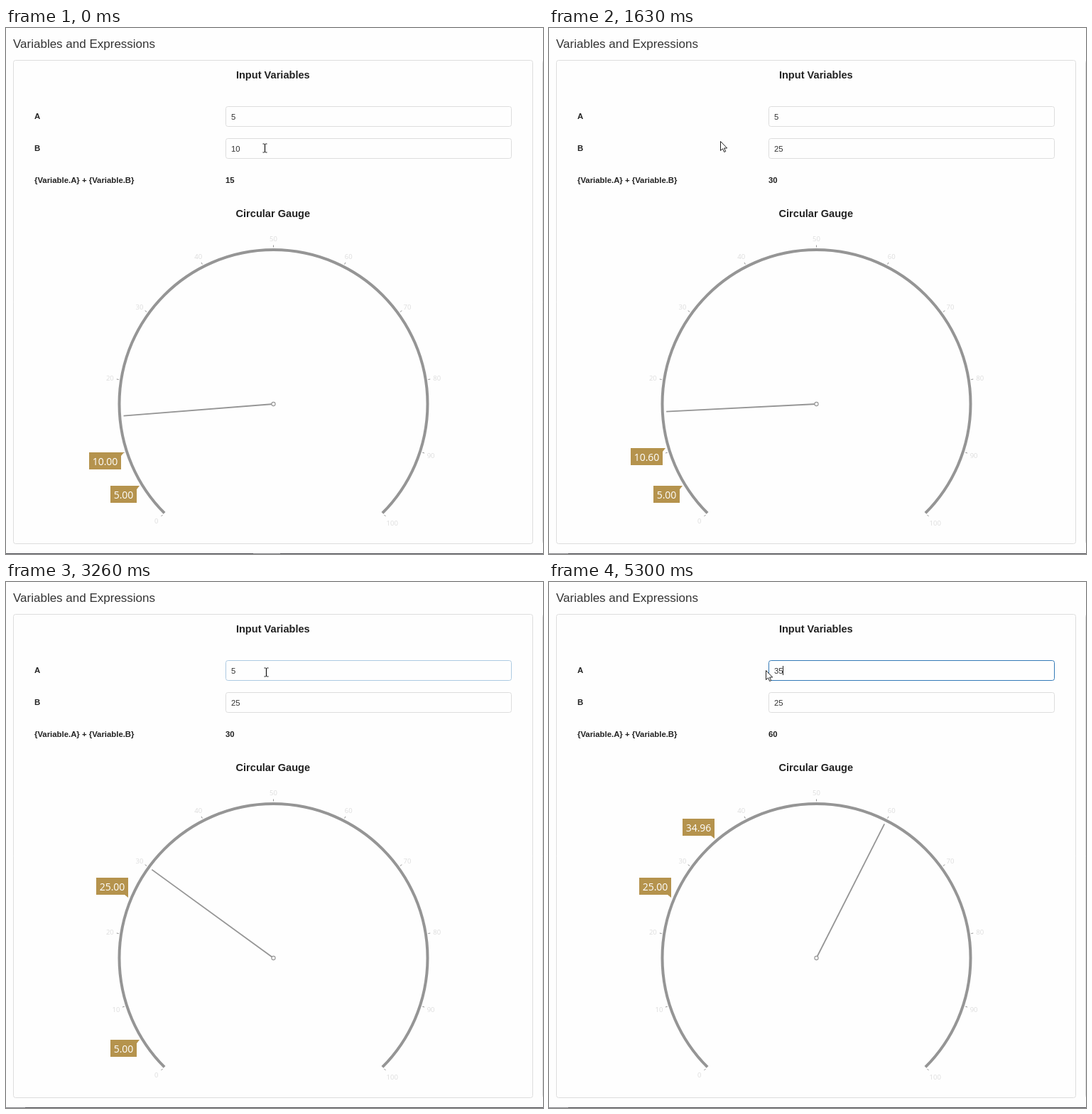
An HTML page with a canvas that plays this animation: 756x740 px, repeating every 5.33 s.

```html
<!DOCTYPE html>
<html lang="en">
<head>
<meta charset="utf-8">
<title>Variables and Expressions</title>
<style>
html, body { margin: 0; width: 100%; height: 100%; overflow: hidden; background: #fefefe; }
canvas { display: block; }
</style>
</head>
<body>
<canvas id="stage" width="756" height="740"></canvas>
<script>
const ctx = document.getElementById('stage').getContext('2d');
const W = 756, H = 740, LOOP = 5330;
const SANS = '"Liberation Sans", Arial, sans-serif';
const GAUGE_FONT = '"Open Sans", "Noto Sans", sans-serif';
const BG = '#fefefe', GRAY = '#959595', BORDER = '#dddddd', GOLD = '#b5934d';
const HOVER = '#adcae2', FOCUS = '#337ab7';
const CX = 376.5, CY = 529, RING = 217;
const DIGIT = 6.3;

// Pointer path: time, x, y
const PATH = [
  [0, 364.5, 169], [400, 364.5, 169], [460, 361, 169], [740, 312.5, 171],
  [960, 312.5, 171], [1100, 238, 167], [1400, 238, 167], [1570, 241, 159],
  [2260, 241, 159], [2460, 325, 142], [2620, 367, 127],
  [3260, 367, 127], [3430, 305, 124], [LOOP, 305, 124]
];

function pointerAt(t) {
  const i = Math.max(1, PATH.findIndex(p => p[0] > t));
  const [t0, x0, y0] = PATH[i - 1], [t1, x1, y1] = PATH[i];
  const k = (t - t0) / (t1 - t0);
  return { x: x0 + (x1 - x0) * k, y: y0 + (y1 - y0) * k };
}

function tween(t, start, from, to) {
  const k = Math.min(1, Math.max(0, (t - start) / 1042));
  return from + (to - from) * (1 - (1 - k) ** 3);
}

function onDial(value, r) {
  const a = (225 - value * 2.7) * Math.PI / 180;
  return [CX + r * Math.cos(a), CY - r * Math.sin(a)];
}

function text(str, x, y, font, color, align = 'left', baseline = 'alphabetic') {
  ctx.font = font;
  ctx.fillStyle = color;
  ctx.textAlign = align;
  ctx.textBaseline = baseline;
  ctx.fillText(str, x, y);
}

function box(x, y, w, h, color) {
  ctx.beginPath();
  ctx.roundRect(x, y, w, h, 3);
  ctx.strokeStyle = color;
  ctx.lineWidth = 1;
  ctx.stroke();
}

function line(a, b, width, color) {
  ctx.beginPath();
  ctx.moveTo(...a);
  ctx.lineTo(...b);
  ctx.lineWidth = width;
  ctx.strokeStyle = color;
  ctx.stroke();
}

function polygon(points, fill, stroke) {
  ctx.beginPath();
  points.forEach(p => ctx.lineTo(...p));
  ctx.closePath();
  ctx.fillStyle = fill;
  ctx.fill();
  if (stroke) {
    ctx.strokeStyle = stroke;
    ctx.lineWidth = 1;
    ctx.stroke();
  }
}

function input(y, value, border, selected, caret) {
  const font = '11.36px ' + SANS, base = y + 19, end = 317 + value.length * DIGIT;
  box(309.5, y + 0.5, 402, 28, border);
  text(value, 317, base, font, '#333');
  if (selected) {
    const x = end - selected * DIGIT;
    ctx.fillStyle = '#3390ff';
    ctx.fillRect(x, y + 8, end - x, 14);
    text(value.slice(-selected), x, base, font, '#fff');
  }
  if (caret) {
    ctx.fillStyle = '#222';
    ctx.fillRect(Math.floor(end), y + 8, 1, 13);
  }
}

function cloud(value) {
  const str = value.toFixed(2), w = str.length > 4 ? 45 : 37, h = 24, tail = 4;
  const [px, py] = onDial(value, 221).map(Math.round);
  const below = value * 2.7 < 45;
  const x = below ? px - tail - w : px - w;
  const y = below ? py : py - tail - h;
  ctx.fillStyle = GOLD;
  ctx.fillRect(x, y, w, h);
  polygon(below
    ? [[x + w, y], [px, py], [x + w, y + 5]]
    : [[x + w, y + h], [px, py], [x + w - 5, y + h]], GOLD);
  text(str, x + w / 2, y + 18, '14px ' + GAUGE_FONT, '#fff', 'center');
}

function gauge(a, b, sum) {
  for (let v = 0; v <= 100; v += 10) {
    const [x, y] = onDial(v, v === 100 ? 236.5 : 233);
    text(String(v), x, y + 3.5, '9.5px ' + GAUGE_FONT, '#dcdcdc', 'center');
    line(onDial(v, 220.5), onDial(v, 223.5), 1, GRAY);
  }
  ctx.beginPath();
  ctx.arc(CX, CY, RING, Math.PI * 0.75, Math.PI * 2.25);
  ctx.lineWidth = 4;
  ctx.strokeStyle = GRAY;
  ctx.stroke();

  line([CX, CY], onDial(sum, 211.6), 1.8, GRAY);
  ctx.beginPath();
  ctx.arc(CX, CY, 2.6, 0, Math.PI * 2);
  ctx.fillStyle = BG;
  ctx.fill();
  ctx.lineWidth = 1.1;
  ctx.stroke();
  cloud(a);
  cloud(b);
}

function pointer({ x, y }, overInput) {
  if (overInput) {
    const cx = Math.floor(x) + 0.5;
    line([cx, y - 6], [cx, y + 6], 1.2, '#111');
    for (const dy of [-6, 6]) {
      line([cx - 3, y + dy], [cx - 0.8, y + dy], 1, '#111');
      line([cx + 0.8, y + dy], [cx + 3, y + dy], 1, '#111');
    }
    return;
  }
  const shape = [[0, 0], [0, 13], [3, 10.3], [5.2, 15], [7.2, 14.1], [5.1, 9.5], [9.2, 9.5]];
  polygon(shape.map(([dx, dy]) => [x + 0.5 + dx, y + 0.5 + dy]), '#fff', '#222');
}

function draw(t) {
  if (t >= 160 && t < 200) {
    ctx.fillStyle = '#000';
    ctx.fillRect(0, 0, W, H);
    return;
  }
  ctx.fillStyle = BG;
  ctx.fillRect(0, 0, W, H);

  const p = pointerAt(t);
  const inX = p.x > 309 && p.x < 712;
  const overA = inX && p.y > 109 && p.y < 139;
  const overB = inX && p.y > 155 && p.y < 184;
  const focusA = t >= 3290, focusB = t >= 440 && t < 1600;

  // Typed values, selections and carets
  const a = t < 3930 ? '5' : t < 4200 ? '3' : '35';
  const b = t < 960 ? '10' : t < 1230 ? '2' : '25';
  const selA = focusA && t < 3930 && p.x < 320 ? 1 : 0;
  const selB = focusB && t < 960 ? (p.x < 320 ? 2 : p.x < 326 ? 1 : 0) : 0;
  const caretA = focusA && !selA && !(t >= 4700 && t < 5200);
  const caretB = focusB && !selB;
  const sum = t < 1610 ? 15 : t < 4390 ? 30 : 60;
  const border = (focus, over) => focus ? FOCUS : over && t >= 400 ? HOVER : BORDER;

  box(10.5, 45.5, 731, 680, BORDER);
  box(755.5, 45.5, 731, 680, BORDER);
  ctx.fillStyle = '#4b4b50';
  ctx.fillRect(0, 739, W, 1);
  ctx.fillStyle = '#85858a';
  if (t < 400) ctx.fillRect(348, 739, 38, 1);
  else ctx.fillRect(0, 739, 27, 1);

  const bold = '11.36px ' + SANS, heading = 'bold 14.6px ' + SANS;
  text('Variables and Expressions', 10, 28, '17px ' + SANS, '#333');
  text('Input Variables', 375.8, 71, heading, '#222', 'center');
  text('Circular Gauge', 375.8, 266, heading, '#222', 'center');
  text('A', 40, 128, 'bold ' + bold, '#222');
  text('B', 40, 173, 'bold ' + bold, '#222');
  text('{Variable.A} + {Variable.B}', 40, 218, 'bold ' + bold, '#222');
  text(String(sum), 309, 218, 'bold ' + bold, '#222');

  input(110, a, border(focusA, overA), selA, caretA);
  input(155, b, border(focusB, overB), selB, caretB);

  gauge(
    tween(t, 4372, 5, 35),
    tween(t, 1617, 10, 25),
    t < 4372 ? tween(t, 1617, 15, 30) : tween(t, 4372, 30, 60)
  );
  pointer(p, overA || overB);

  if (t >= 130 && t < 160) {
    ctx.fillStyle = 'rgba(0, 0, 0, 0.5)';
    ctx.fillRect(0, 0, W, H);
  }
}

const begin = performance.now();
function tick() {
  draw((performance.now() - begin) % LOOP);
  requestAnimationFrame(tick);
}
tick();
</script>
</body>
</html>
```
